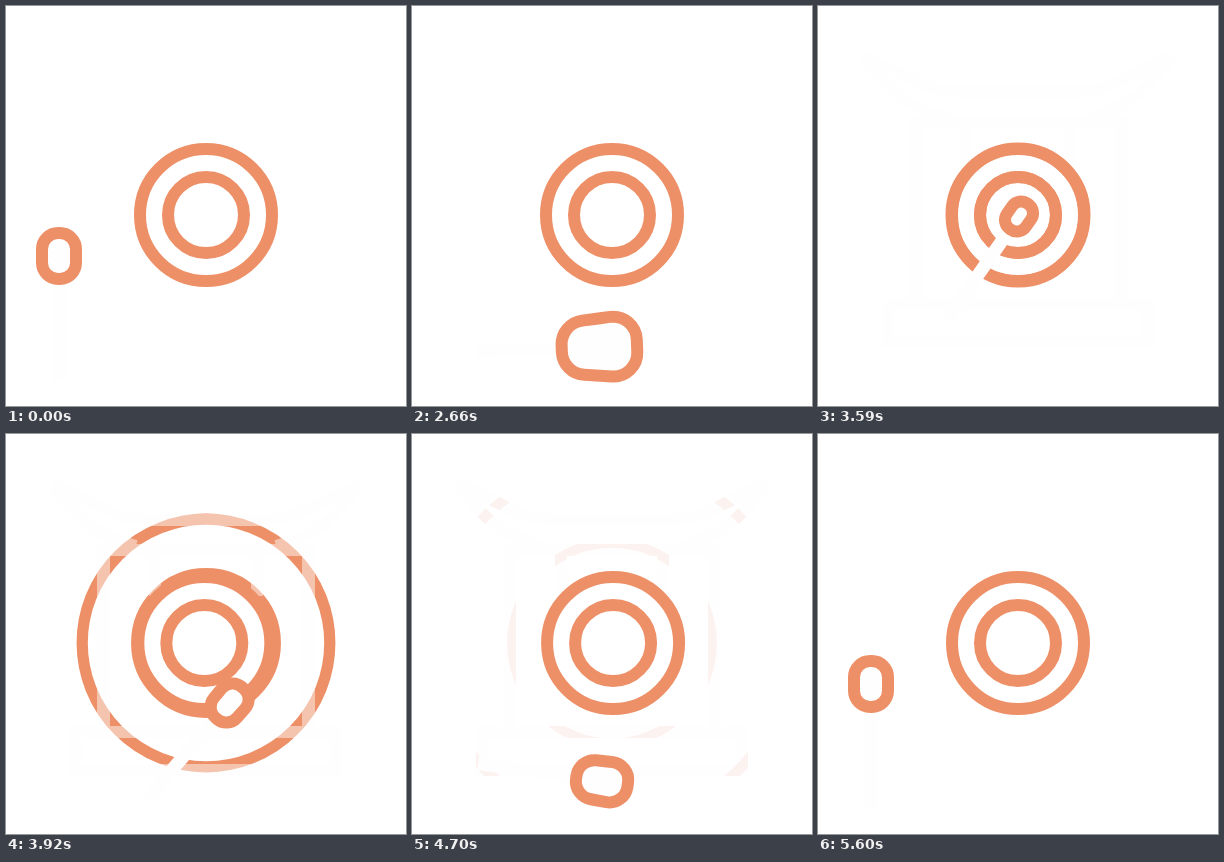
These frames come from a looping animation (400 px wide and 400 px high, 5630 ms). An HTML page with a canvas:

```html
<!DOCTYPE html>
<html lang="en">
<head>
<meta charset="utf-8">
<title>Gong</title>
<style>
  html, body { margin: 0; width: 100%; height: 100%; overflow: hidden; background: #fff; }
  canvas { display: block; width: 400px; height: 400px; }
</style>
</head>
<body>
<canvas id="stage" width="400" height="400"></canvas>
<script>
const SIZE = 400, LOOP = 5630, START = 2030, STEP = 30;
const STRIKE = 3590, SPREAD = 3630;
const ORANGE = '#ee9067', PALE = '#fefefe', LINE = 12;
const CX = 200, CY = 209;

const ctx = document.getElementById('stage').getContext('2d');
const standCanvas = document.createElement('canvas');
standCanvas.width = standCanvas.height = SIZE;
const standCtx = standCanvas.getContext('2d');

const clamp = v => Math.min(1, Math.max(0, v));
const lerp = (a, b, p) => a + (b - a) * p;
const easeIn = p => p * p;
const easeOut = p => Math.sin(p * Math.PI / 2);
const easeInOut = p => p * p * (3 - 2 * p);

// Half length, half width and taper describe the head; angle is in degrees
const rest = { x: 53, y: 250, len: 23, width: 17, taper: 0, angle: -90 };
const swung = { x: 205, y: 333, len: 37, width: 28, taper: 3, angle: -4 };
const ready = { x: 179, y: 345, len: 38, width: 29, taper: 4, angle: 2 };
const struck = { x: 201, y: 210.5, len: 15.5, width: 11.5, taper: 0, angle: -55 };
const low = { x: 190, y: 347, len: 26, width: 20, taper: 1, angle: 8 };

// Moves follow each other; "via" bends the path into an arc
const MOVES = [
  { from: rest, to: swung, start: 2010, end: 2570, ease: easeInOut, via: { x: 160, y: 120 } },
  { from: swung, to: ready, start: 2570, end: 2760, ease: easeOut },
  { from: ready, to: struck, start: 3150, end: STRIKE, ease: easeIn },
  { from: struck, to: low, start: STRIKE, end: 4700, ease: easeOut, via: { x: 251, y: 273 } },
  { from: low, to: rest, start: 4700, end: 5540, ease: easeInOut }
];

function malletPose(t) {
  const move = MOVES.filter(m => t >= m.start).pop() || MOVES[0];
  const { from, to, via } = move;
  const p = move.ease(clamp((t - move.start) / (move.end - move.start)));
  const pose = {};
  for (const key in from) pose[key] = lerp(from[key], to[key], p);
  if (via) {
    for (const key of ['x', 'y']) {
      pose[key] = lerp(lerp(from[key], via[key], p), lerp(via[key], to[key], p), p);
    }
  }
  pose.angle = lerp(from.angle, to.angle, p ** 3); // turning lags behind
  return pose;
}

function ring(g, x, radius, width) {
  g.lineWidth = width;
  g.strokeStyle = ORANGE;
  g.beginPath();
  g.arc(x, CY, radius - width / 2, 0, Math.PI * 2);
  g.stroke();
}

function waves(g, age) {
  const e = 1 - (1 - clamp(age / 1400)) ** 3;
  ring(g, CX, lerp(72.5, 186, e), lerp(12, 10.5, e));
  ring(g, CX, lerp(44, 105.7, e), lerp(12, 9.5, e));
}

function buildStand(g) {
  g.fillStyle = g.strokeStyle = PALE;
  g.lineWidth = LINE;
  g.fillRect(91, 110, 218, 12);
  for (const x of [91, 296]) g.fillRect(x, 110, 13, 182);
  for (const x of [143, 245]) g.fillRect(x, 122, 12, 40);
  g.strokeRect(70, 298, 260, 38);
  g.beginPath();
  g.moveTo(145, 86);
  g.lineTo(255, 86);
  for (const side of [-1, 1]) {
    const x = d => CX + side * d;
    g.moveTo(x(154), 50);
    g.lineTo(x(93), 79);
    g.quadraticCurveTo(x(75), 86, x(55), 86);
    g.moveTo(x(154), 50);
    g.bezierCurveTo(x(130), 83, x(110), 102, x(70), 112);
  }
  g.stroke();
}

function drawWaves(t) {
  if (t < STRIKE || t > 4840) return;
  const age = Math.max(0, t - SPREAD);
  if (age < 700) waves(ctx, age);

  // The stand is opaque, so the fading waves stay visible on it for longer
  standCtx.globalCompositeOperation = 'source-over';
  standCtx.globalAlpha = 1;
  standCtx.clearRect(0, 0, SIZE, SIZE);
  buildStand(standCtx);
  standCtx.globalCompositeOperation = 'source-atop';
  standCtx.globalAlpha = Math.exp(-age / 450);
  waves(standCtx, age);
  ctx.drawImage(standCanvas, 0, 0);
}

function drawGong(t) {
  const age = Math.max(0, t - STRIKE - 10);
  const shake = 1.7 * clamp((5540 - t) / 200) * Math.sin(age / 180 * Math.PI * 2);
  ring(ctx, CX + shake, 72, LINE);
  ring(ctx, CX + shake, 44, LINE);
}

function drawMallet(t) {
  const { x, y, len, width, taper, angle } = malletPose(t);
  const near = width - taper, far = width + taper, r = near * 0.95;
  ctx.save();
  ctx.translate(x, y);
  ctx.rotate(angle * Math.PI / 180);
  ctx.fillStyle = PALE;
  ctx.fillRect(-125, -6.5, 125, 13);
  ctx.beginPath();
  ctx.moveTo(0, -width);
  ctx.arcTo(len, -far, len, far, r);
  ctx.arcTo(len, far, -len, near, r);
  ctx.arcTo(-len, near, -len, -near, r);
  ctx.arcTo(-len, -near, len, -far, r);
  ctx.closePath();
  ctx.fill();
  ctx.lineWidth = LINE;
  ctx.strokeStyle = ORANGE;
  ctx.stroke();
  ctx.restore();
}

function draw(now) {
  const time = now % LOOP;
  const t = time < START ? 0 : START + Math.floor((time - START) / STEP) * STEP;
  ctx.fillStyle = '#fff';
  ctx.fillRect(0, 0, SIZE, SIZE);
  drawWaves(t);
  drawGong(t);
  drawMallet(t);
}

const began = performance.now();
function tick() {
  draw(performance.now() - began);
  requestAnimationFrame(tick);
}
tick();
</script>
</body>
</html>
```
